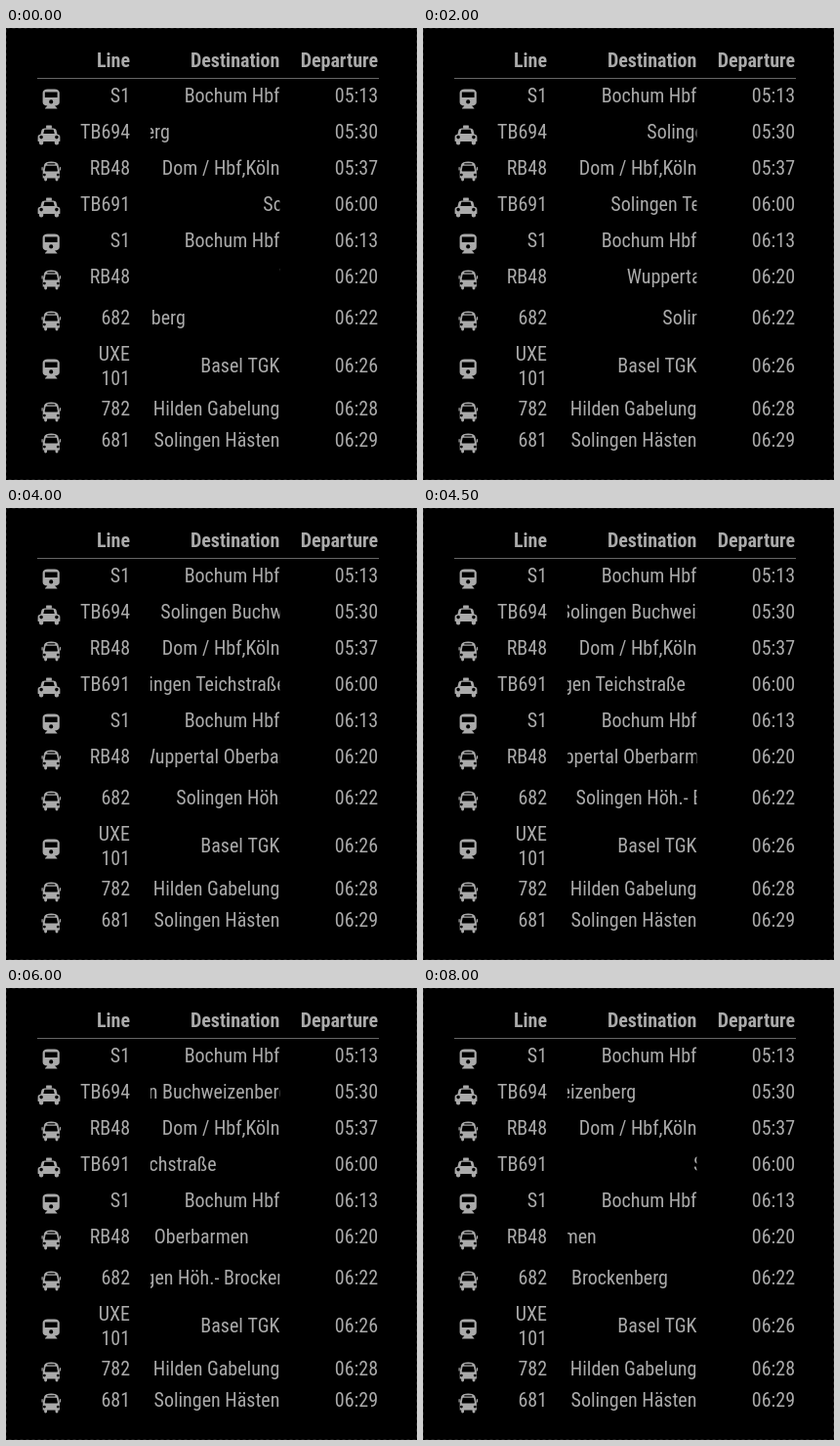
An HTML page with a canvas that plays this animation: 421x462 px, repeating every 8500 ms.

```html
<!DOCTYPE html>
<html lang="de">
<head>
<meta charset="utf-8">
<title>Departures</title>
<style>
  html, body { margin: 0; width: 100%; height: 100%; overflow: hidden; background: #000; }
  canvas { display: block; }
</style>
</head>
<body>
<canvas id="board" width="421" height="462"></canvas>
<script>
const ctx = document.getElementById("board").getContext("2d");
const LOOP = 8500, STEP = 500;
const INK = "#aaa";
const LINE_RIGHT = 127, DEST_LEFT = 148, DEST_RIGHT = 280.4, TIME_RIGHT = 381;
const SPEED = 35.5; // marquee, px per second
const FACE = '20px "Roboto Condensed", Roboto, sans-serif';

// icon, line, destination, departure, vertical centre, second at which a marquee enters
const rows = [
  ["train", "S1", "Bochum Hbf", "05:13", 69],
  ["taxi", "TB694", "Solingen Buchweizenberg", "05:30", 106, 0.56],
  ["bus", "RB48", "Dom / Hbf,Köln", "05:37", 143],
  ["taxi", "TB691", "Solingen Teichstraße", "06:00", 180, -0.48],
  ["train", "S1", "Bochum Hbf", "06:13", 217],
  ["bus", "RB48", "Wuppertal Oberbarmen", "06:20", 254, -0.02],
  ["bus", "682", "Solingen Höh.- Brockenberg", "06:22", 296, 1.01],
  ["train", "UXE 101", "Basel TGK", "06:26", 345],
  ["bus", "782", "Hilden Gabelung", "06:28", 389],
  ["bus", "681", "Solingen Hästen", "06:29", 421]
];

const setFont = weight => { ctx.font = `${weight} condensed ${FACE}`; };

// Use the condensed face where there is one, else narrow the regular face evenly.
function findCondense() {
  const sample = "Departure board";
  ctx.font = "20px Roboto, sans-serif";
  const regular = ctx.measureText(sample).width;
  setFont(400);
  return ctx.measureText(sample).width < regular * 0.95 ? 1 : 0.89;
}
const condense = findCondense();
const textWidth = text => ctx.measureText(text).width * condense;

function write(text, x, centre, align = "right") {
  ctx.save();
  ctx.translate(x, centre + 7);
  ctx.scale(condense, 1);
  ctx.textAlign = align;
  ctx.fillText(text, 0, 0);
  ctx.restore();
}

const mod = (a, n) => ((a % n) + n) % n;

function marquee(text, centre, enter, t) {
  const span = DEST_RIGHT - DEST_LEFT;
  const travelled = mod((t - enter) * SPEED, span + textWidth(text));
  ctx.save();
  ctx.beginPath();
  ctx.rect(DEST_LEFT, centre - 14, span, 28);
  ctx.clip();
  write(text, DEST_RIGHT - travelled, centre, "left");
  ctx.restore();
}

function disc(path, x, y, r) {
  path.moveTo(x + r, y);
  path.arc(x, y, r, 0, Math.PI * 2);
}

// Each icon is a list of shapes filled in turn, centred on x = 0, y = 0.
function makeTrain() {
  const body = new Path2D("M-3.6-10H3.6C6.4-10 8.6-8.4 8.6-6.4V3.6C8.6 5.6 6.5 7 3.8 7.1L6.2 9.4Q6.4 10 5.9 10H-5.9Q-6.4 10-6.2 9.4L-3.8 7.1C-6.5 7-8.6 5.6-8.6 3.6V-6.4C-8.6-8.4-6.4-10-3.6-10Z");
  body.rect(-6.4, -7.1, 12.8, 5.7);
  disc(body, 0, 2.9, 2.1);
  return [body];
}

function makeBus() {
  const body = new Path2D("M-8.6 7.1V.4Q-8.6-.8-8.3-2.1L-7.1-7.1C-6.6-9-3.8-10 0-10S6.6-9 7.1-7.1L8.3-2.1Q8.6-.8 8.6.4V7.1Z"
    + "M-5.1-5.7H5.1Q5.7-5.7 5.8-5.1L6.6-.8Q6.7 0 5.9 0H-5.9Q-6.7 0-6.6-.8L-5.8-5.1Q-5.7-5.7-5.1-5.7Z");
  body.roundRect(-4.1, -8.2, 8.2, 1.1, 0.5);
  const extras = new Path2D();
  for (const side of [-1, 1]) {
    disc(body, side * 7.1 - side * 0.2, 3.6, 1.4);
    extras.roundRect(side * 5.7 - 1.45, 6.5, 2.9, 3.5, [0, 0, 1.4, 1.4]);
    extras.roundRect(side * 9.2 - 0.6, -4.6, 1.2, 3.6, 0.6);
  }
  return [body, extras];
}

function makeTaxi() {
  const body = new Path2D("M-8.6-.7L-7.4-5.4Q-6.8-7.1-4.3-7.1H4.3Q6.8-7.1 7.4-5.4L8.6-.7C10.4-.7 11.4.4 11.4 1.8V6.1Q11.4 6.4 11.1 6.4H-11.1Q-11.4 6.4-11.4 6.1V1.8C-11.4.4-10.4-.7-8.6-.7Z"
    + "M-5.7-1.4H5.7L4.7-5.4Q4.6-5.7 4.3-5.7H-4.3Q-4.6-5.7-4.7-5.4Z");
  const extras = new Path2D();
  extras.roundRect(-2.9, -10, 5.8, 3.2, 0.4);
  for (const side of [-1, 1]) {
    disc(body, side * 7.9, 2.1, 1.8);
    extras.roundRect(side * 7.9 - 2.15, 6, 4.3, 4, [0, 0, 2.1, 2.1]);
  }
  return [body, extras];
}

const icons = {
  train: { x: 46.2, shapes: makeTrain() },
  bus: { x: 46.3, shapes: makeBus() },
  taxi: { x: 44, shapes: makeTaxi() }
};

function drawIcon(name, centre) {
  const { x, shapes } = icons[name];
  ctx.save();
  ctx.translate(x, centre + 3.5);
  for (const shape of shapes) ctx.fill(shape, "evenodd");
  ctx.restore();
}

function drawFrame() {
  ctx.fillStyle = "#000";
  ctx.fillRect(0, 0, 421, 462);
  ctx.strokeStyle = "#1c1c1c";
  ctx.lineWidth = 1;
  ctx.setLineDash([3, 3]);
  ctx.strokeRect(0.5, 0.5, 420, 461);
  ctx.setLineDash([]);
}

function draw(t) {
  drawFrame();
  ctx.fillStyle = "#666";
  ctx.fillRect(32, 51, 350, 1);

  ctx.fillStyle = INK;
  setFont(700);
  write("Line", LINE_RIGHT, 33);
  write("Destination", DEST_RIGHT, 33);
  write("Departure", TIME_RIGHT, 33);

  setFont(400);
  for (const [icon, line, destination, time, y, enter] of rows) {
    drawIcon(icon, y);
    const parts = line.split(" ");
    parts.forEach((part, i) =>
      write(part, LINE_RIGHT, y + (i - (parts.length - 1) / 2) * 25));
    if (enter === undefined) write(destination, DEST_RIGHT, y);
    else marquee(destination, y, enter, t);
    write(time, TIME_RIGHT, y);
  }
}

function tick() {
  const now = performance.now() % LOOP;
  draw(Math.floor(now / STEP) * STEP / 1000);
  requestAnimationFrame(tick);
}
tick();
</script>
</body>
</html>
```
